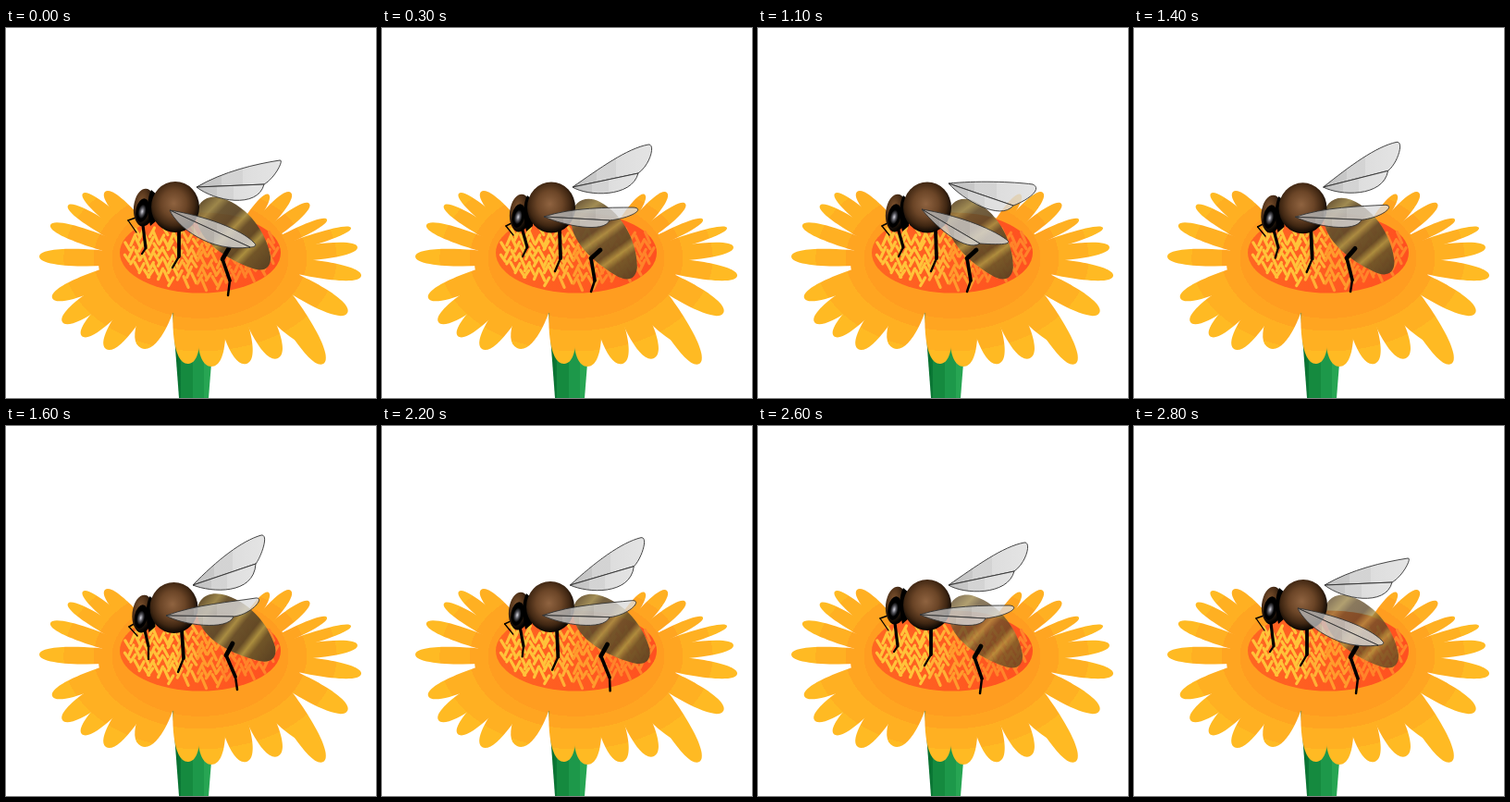
Animation, 400 px wide and 400 px high, one loop 3500 ms. Source, as an HTML page:

```html
<!DOCTYPE html>
<html lang="en">
<head>
<meta charset="utf-8">
<title>Bee on a flower</title>
<style>
html, body { margin: 0; width: 100%; height: 100%; overflow: hidden; background: #fff; }
svg { display: block; width: 100vw; height: 100vh; }
</style>
</head>
<body>
<svg viewBox="0 0 400 400">
  <defs>
    <radialGradient id="petal" gradientUnits="userSpaceOnUse" cx="0" cy="0" r="180" gradientTransform="translate(210 249) scale(1 .68)">
      <stop offset=".53" stop-color="#ff9d20"/><stop offset=".53" stop-color="#ffa521"/>
      <stop offset=".64" stop-color="#ffa521"/><stop offset=".64" stop-color="#ffb022"/>
      <stop offset=".82" stop-color="#ffb022"/><stop offset=".82" stop-color="#ffba23"/>
    </radialGradient>
    <linearGradient id="stem">
      <stop offset="0" stop-color="#07692c"/><stop offset=".22" stop-color="#0b7936"/>
      <stop offset=".22" stop-color="#158a3f"/><stop offset=".5" stop-color="#158a3f"/>
      <stop offset=".5" stop-color="#1d984a"/><stop offset=".8" stop-color="#1d984a"/>
      <stop offset=".8" stop-color="#27a553"/>
    </linearGradient>
    <linearGradient id="disc">
      <stop offset="0" stop-color="#ff6622"/><stop offset="1" stop-color="#ff5020"/>
    </linearGradient>
    <linearGradient id="abdomen" gradientUnits="userSpaceOnUse" x1="212" y1="188" x2="282" y2="256">
      <stop offset="0" stop-color="#66502c"/><stop offset=".13" stop-color="#9a8345"/>
      <stop offset=".22" stop-color="#67512d"/><stop offset=".36" stop-color="#5f492a"/>
      <stop offset=".45" stop-color="#a68d43"/><stop offset=".53" stop-color="#67502a"/>
      <stop offset=".65" stop-color="#5f4825"/><stop offset=".73" stop-color="#a88e3f"/>
      <stop offset=".81" stop-color="#6d5428"/><stop offset="1" stop-color="#594222"/>
    </linearGradient>
    <radialGradient id="thorax" cx=".47" cy=".43" r=".58">
      <stop offset="0" stop-color="#8f6340"/><stop offset=".45" stop-color="#6b4527"/>
      <stop offset=".75" stop-color="#3f2612"/><stop offset="1" stop-color="#000"/>
    </radialGradient>
    <radialGradient id="head" cx=".35" cy=".35" r=".65">
      <stop offset="0" stop-color="#80542f"/><stop offset=".5" stop-color="#4f3119"/>
      <stop offset="1" stop-color="#000"/>
    </radialGradient>
    <radialGradient id="eye" cx=".5" cy=".55" r=".5">
      <stop offset="0" stop-color="#d5d5de"/><stop offset=".3" stop-color="#55555c"/>
      <stop offset=".6" stop-color="#000"/>
    </radialGradient>
    <linearGradient id="wing">
      <stop offset="0" stop-color="#b4b4b4"/><stop offset=".3" stop-color="#bcbcbc"/>
      <stop offset=".3" stop-color="#cacaca"/><stop offset=".55" stop-color="#cacaca"/>
      <stop offset=".55" stop-color="#d6d6d6"/><stop offset="1" stop-color="#dedede"/>
    </linearGradient>
  </defs>
  <path d="M180 306L187 400H219L223 350V306Z" fill="url(#stem)"/>
  <g id="petals" fill="url(#petal)"><ellipse cx="210" cy="255" rx="110" ry="55"/></g>
  <ellipse cx="210" cy="243" rx="87" ry="43.5" fill="url(#disc)"/>
  <g id="pollen" stroke-width="3.2" stroke-linecap="round"></g>
  <path id="tail" fill="url(#abdomen)" d="M206 205C205 188 218 179 234 184C262 193 282 222 286 247C287 262 276 264 264 259C240 250 208 231 206 205Z"/>
  <g id="far" fill="url(#wing)" fill-opacity=".82" stroke="#333" stroke-width=".9" stroke-linejoin="round"></g>
  <g id="legs" stroke="#000" stroke-linecap="round"></g>
  <g id="face">
    <ellipse cx="149.500" cy="194" rx="11.500" ry="20.500" fill="url(#head)" transform="rotate(6 149 194)"/>
    <path d="M157 175Q150 188 156 214L163 208V180Z"/>
    <ellipse cx="147.500" cy="197" rx="7" ry="13" fill="url(#eye)" transform="rotate(12 147 197)"/>
  </g>
  <ellipse id="chest" rx="26" ry="27.500" fill="url(#thorax)"/>
  <g id="near" fill="url(#wing)" fill-opacity=".8" stroke="#333" stroke-width=".9" stroke-linejoin="round"></g>
</svg>
<script>
const $ = id => document.getElementById(id);
const add = (parent, tag, attrs = {}) => {
  const el = document.createElementNS('http://www.w3.org/2000/svg', tag);
  set(el, attrs);
  return parent.appendChild(el);
};
function set(el, attrs) {
  for (const name in attrs) el.setAttribute(name, attrs[name]);
}

// Tip x, tip y, width, optional base
const petals = [
  [107, 177, 11], [83, 179, 9], [67, 192, 9], [48, 213, 10], [36, 247, 11],
  [50, 292, 12], [61, 318, 13], [82, 333, 13], [108, 347, 15], [146, 346, 19],
  [197, 363, 17, 193, 285], [222, 366, 18, 222, 285], [260, 363, 17, 234, 280],
  [294, 357, 17, 255, 275], [331, 341, 15, 262, 275], [343, 363, 15, 288, 275],
  [369, 308, 14], [384, 268, 11], [380, 237, 10], [373, 216, 7], [347, 207, 7],
  [328, 190, 9], [308, 178, 10], [284, 180, 8]
];
for (const [x, y, w, bx = 105 + x / 2, by = 187.5 + y / 4] of petals) {
  const dx = x - bx, dy = y - by, len = Math.hypot(dx, dy);
  const at = (k, side) => `${bx + dx * k - dy / len * side} ${by + dy * k + dx / len * side}`;
  add($('petals'), 'path', {
    d: `M${at(0, w * .6)}C${at(.4, w)} ${at(1, w)} ${x} ${y}C${at(1, -w)} ${at(.4, -w)} ${at(0, -w * .6)}Z`
  });
}

let seed = 11;
const rand = () => (seed = seed * 16807 % 2147483647) / 2147483647;
for (let col = 0; col < 33; col++) {
  for (let row = 0; row < 6; row++) {
    const x = 125 + col * 5.2 + rand() * 2;
    const y = 214 + row * 12 + (col % 3) * 4 + rand() * 4;
    const lean = col % 2 ? -2.5 : 2.5, len = 7 + rand() * 5;
    if (((x - 210) / 86) ** 2 + ((y + len / 2 - 241) / 38) ** 2 > .96) continue;
    const hue = x < 185 ? '#ffc33a' : x < 208 ? '#ffb136' : x < 232 ? '#ff9b2d' : '#ff842a';
    add($('pollen'), 'line', { x1: x + lean, y1: y, x2: x - lean, y2: y + len, stroke: hue });
  }
}

// Wing poses: rest, up, high, down
const farPoses = [
  [206, 172, 235, 155, 270, 147, 296, 143, 301, 142, 291, 162, 279, 169, 225, 187, 272, 196],
  [206, 172, 235, 152, 265, 130, 288, 126, 296, 125, 290, 148, 277, 157, 222, 182, 270, 184],
  [202, 172, 228, 145, 255, 124, 276, 118, 285, 117, 275, 143, 270, 149, 222, 180, 268, 183],
  [206, 168, 235, 165, 275, 166, 297, 169, 308, 174, 292, 186, 276, 192, 222, 186, 262, 209]
];
const nearPoses = [
  [177, 197, 215, 203, 255, 218, 268, 232, 275, 238, 258, 237, 264, 237, 185, 215, 220, 243],
  [175, 204, 205, 194, 245, 194, 272, 194, 284, 195, 272, 205, 246, 208, 198, 214, 240, 222],
  [173, 205, 205, 193, 245, 190, 270, 186, 281, 185, 265, 204, 246, 206, 190, 215, 240, 222],
  [177, 196, 213, 202, 250, 215, 269, 229, 277, 235, 255, 234, 240, 233, 195, 218, 225, 242]
];

// Body poses: head shift, chest, tail angle, tail opacity, then leg joints
const bodyPoses = [
  [0, 0, 183, 193.5, 0, .97],
  [0, 6, 183, 194, 10, .92],
  [-1.5, 9, 181.5, 196.5, -6, .97],
  [0, 0, 183, 193.5, 0, .77]
];
const legPoses = [
  [143, 204, 132, 208, 141, 221, 148, 213, 151, 238, 147, 244, 187, 217, 187, 247, 180, 259, 241, 238, 234, 250, 242, 273, 240, 289],
  [144, 209, 134, 214, 142, 224, 152, 219, 157, 237, 152, 247, 192, 219, 193, 249, 187, 263, 236, 240, 226, 249, 230, 273, 226, 285],
  [142, 212, 133, 217, 142, 227, 150, 221, 154, 238, 154, 252, 190, 221, 192, 251, 186, 266, 245, 235, 238, 248, 248, 271, 250, 285]
];
legPoses.push(legPoses[0]);

// First joint and width of each leg segment
const segments = [[0, 1.5], [1, 1.3], [3, 3.2], [4, 2.2], [6, 3.8], [7, 2.3], [9, 4.8], [10, 3.7], [11, 2.5]];
const legLines = segments.map(([, w]) => add($('legs'), 'line', { 'stroke-width': w }));
const wings = ['far', 'near'].map(id => [add($(id), 'path'), add($(id), 'path')]);

// Start time, body pose, wing pose
const steps = [
  [0, 0, 0], [100, 1 / 3, 1 / 3], [200, 2 / 3, 2 / 3], [300, 1, 1],
  [900, 1, 3], [1000, 1, 1], [1100, 1, 3], [1200, 1, 1],
  [1400, 4 / 3, 4 / 3], [1500, 5 / 3, 5 / 3], [1600, 2, 2],
  [2200, 7 / 3, 5 / 3], [2300, 8 / 3, 4 / 3], [2400, 3, 1],
  [2500, 3, 3], [2600, 3, 1], [2700, 3, .5], [2800, 3, 0]
];

function blend(poses, k) {
  const i = Math.floor(k), next = poses[Math.min(i + 1, poses.length - 1)];
  return poses[i].map((v, n) => v + (next[n] - v) * (k - i));
}

function drawWing([upper, lower], p) {
  const pt = i => `${p[i * 2]} ${p[i * 2 + 1]}`;
  set(lower, { d: `M${pt(0)}C${pt(7)} ${pt(8)} ${pt(6)}Z` });
  set(upper, { d: `M${pt(0)}C${pt(1)} ${pt(2)} ${pt(3)}C${pt(4)} ${pt(5)} ${pt(6)}Z` });
}

function draw(time) {
  const [, body, wing] = steps.filter(s => s[0] <= time).pop();
  const [hx, hy, cx, cy, angle, opacity] = blend(bodyPoses, body);
  set($('face'), { transform: `translate(${hx} ${hy})` });
  set($('chest'), { cx, cy });
  set($('tail'), { transform: `rotate(${angle} 212 195)`, opacity });
  const legs = blend(legPoses, body);
  segments.forEach(([joint], i) => {
    const [x1, y1, x2, y2] = legs.slice(joint * 2, joint * 2 + 4);
    set(legLines[i], { x1, y1, x2, y2 });
  });
  drawWing(wings[0], blend(farPoses, wing));
  drawWing(wings[1], blend(nearPoses, wing));
}

const start = performance.now();
function tick() {
  draw((performance.now() - start) % 3500);
  requestAnimationFrame(tick);
}
tick();
</script>
</body>
</html>
```
